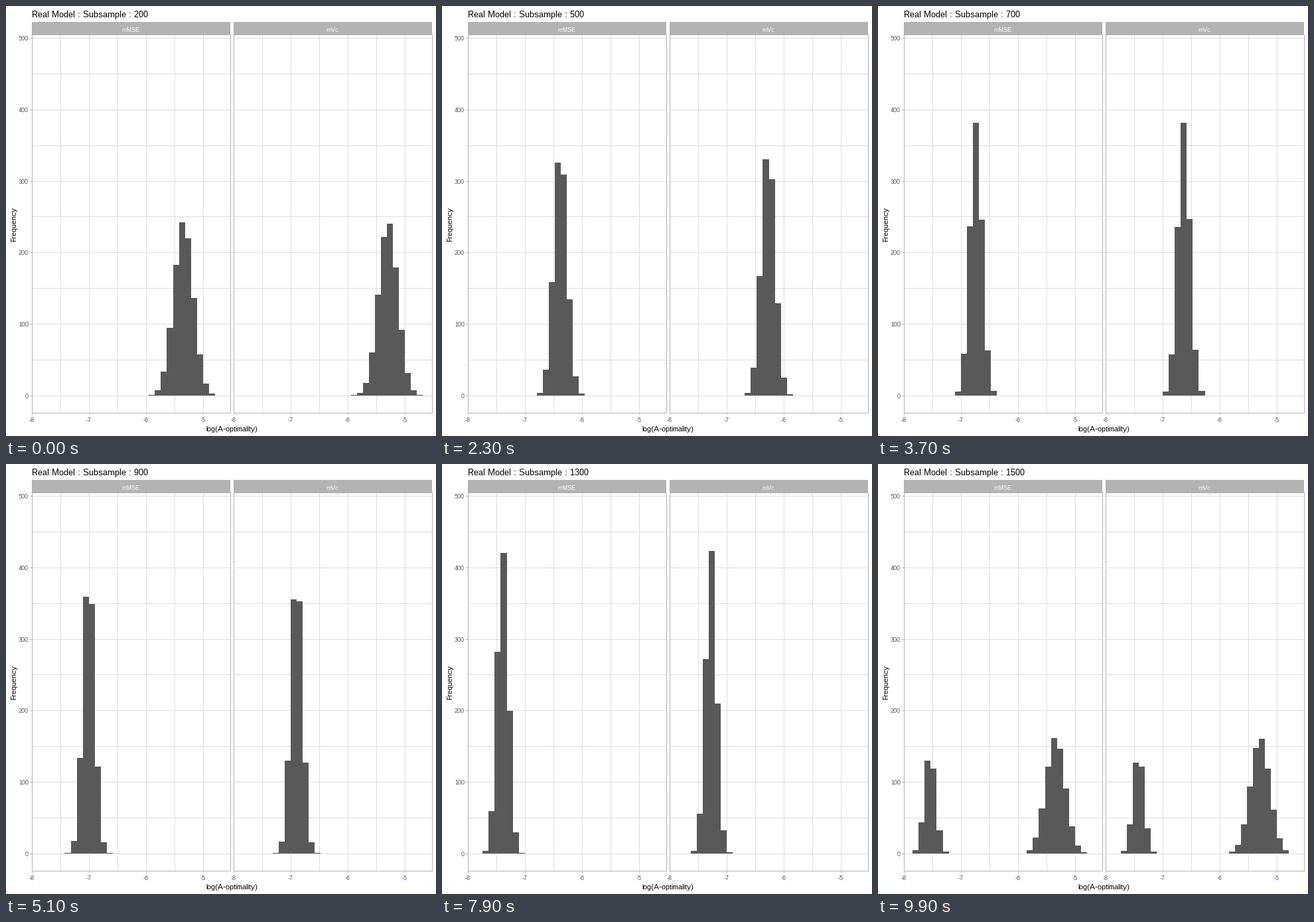
Recreate the animation shown at these times as a matplotlib script. Size 648x648 px, loop 10 s.

```python
import math
import numpy as np
import matplotlib.pyplot as plt
from matplotlib.animation import FuncAnimation
from matplotlib.patches import Rectangle

# Whole-pixel hinting and no kerning give crisp small labels
plt.rcParams.update({
    "font.family": "Liberation Sans",
    "text.hinting": "native",
    "text.hinting_factor": 1,
    "text.kerning_factor": 6,
})

SIZE = 648
BINS = 30
SIZES = np.arange(200, 1501, 100)
GREY, GRID, BAR, LABEL = "#B3B3B3", "#DEDEDE", "#595959", "#4D4D4D"

# Panel geometry in pixels: left edge, left edge of the first bin, name
PANELS = [(39, 52.735, "mMSE"), (343, 357.147, "mVc")]
TOP, BOTTOM, WIDTH = 43, 613, 299
UNIT_X, UNIT_Y, BASE = 86, 1.0775, 587
BIN_W = 9.0588

# Centre of the first panel's histogram, in bins, at some sample sizes
KEY_SIZES = [200, 300, 500, 700, 900, 1300, 1500]
KEY_CENTRES = [23.24, 18.67, 13.43, 10.02, 7.47, 3.85, 2.42]


def histogram(n, panel):
    """Bell of 1000 draws that moves left and narrows as n grows."""
    mean = np.interp(math.log(n), np.log(KEY_SIZES), KEY_CENTRES)
    mean += panel * (1.05 - 23000 / n ** 2)
    sd = 0.81 + 164 / n
    z = (np.arange(BINS) - mean) / sd
    return np.round(1000 / (sd * math.sqrt(2 * math.pi)) * np.exp(-z * z / 2))


STATES = np.array([[histogram(int(n), p) for p in range(2)] for n in SIZES])

# Frame at which each state starts to change, and the steps it takes
STARTS = [4, 12, 20] + list(range(28, 99, 7))
STEPS = [4] * 3 + [3] * 11

fig = plt.figure(figsize=(SIZE / 72, SIZE / 72), dpi=72, facecolor="white")
ax = fig.add_axes([0, 0, 1, 1])
ax.set_xlim(0, SIZE)
ax.set_ylim(SIZE, 0)
ax.axis("off")


def box(x, y, w, h, color, z=1):
    r = Rectangle((x, y), w, h, facecolor=color, linewidth=0,
                  antialiased=False, zorder=z)
    return ax.add_patch(r)


def text(x, y, s, size, color="black", ha="center", **kw):
    return ax.text(x, y, s, fontsize=size, color=color, ha=ha,
                   va="baseline", zorder=5, **kw)


def row(v):
    return math.floor(587.3 - UNIT_Y * v)


def draw_panel(left, name):
    box(left, 24, WIDTH, 20, GREY)
    text(left + WIDTH / 2 - 1, 39, name, 9, "white")
    for v in range(0, 501, 50):
        box(left, row(v), WIDTH, 1, GRID)
    for i in range(1, 7):
        box(left + i * UNIT_X // 2, TOP, 1, BOTTOM - TOP, GRID)
    for y in (TOP, BOTTOM):
        box(left, y, WIDTH + 1, 1, GREY, 4)
    for x in (left, left + WIDTH):
        box(x, TOP, 1, BOTTOM - TOP + 1, GREY, 4)
    for i in range(4):
        x = left + i * UNIT_X
        box(x, BOTTOM, 1, 3, GREY)
        text(x, 627, f"-{8 - i}", 9, LABEL)


def make_bars(origin):
    edges = [math.floor(origin + k * BIN_W) for k in range(BINS + 1)]
    return [box(a, BASE, b - a, 0, BAR, 3) for a, b in zip(edges, edges[1:])]


bars = []
for left, origin, name in PANELS:
    draw_panel(left, name)
    bars.append(make_bars(origin))

for v in range(0, 501, 100):
    box(36, row(v), 3, 1, GREY)
    text(34, row(v) + 4, str(v), 9, LABEL, ha="right")

title = text(39, 17, "", 13, ha="left")
text(340, 641, "log(A-optimality)", 11)
text(15, 329, "Frequency", 11, rotation=90, rotation_mode="anchor")


def state_at(frame):
    """Return the current state index and the progress to the next one."""
    i = sum(s <= frame for s in STARTS) - 1
    if i < 0:
        return 0, 0.0
    t = (frame - STARTS[i] + 1) / STEPS[i]
    return (i, t) if t < 1 else ((i + 1) % len(SIZES), 0.0)


def update(frame):
    i, t = state_at(frame)
    heights = (1 - t) * STATES[i] + t * STATES[(i + 1) % len(SIZES)]
    for group, values in zip(bars, heights):
        for bar, v in zip(group, values):
            top = min(BASE, math.floor(587.75 - UNIT_Y * v))
            bar.set_y(top)
            bar.set_height(BASE - top)
            bar.set_visible(top < BASE)
    title.set_text(f"Real Model : Subsample : {SIZES[i]}")
    return [title]


anim = FuncAnimation(fig, update, frames=100, interval=100,
                     repeat=True, repeat_delay=0, blit=False)
plt.show()
```
